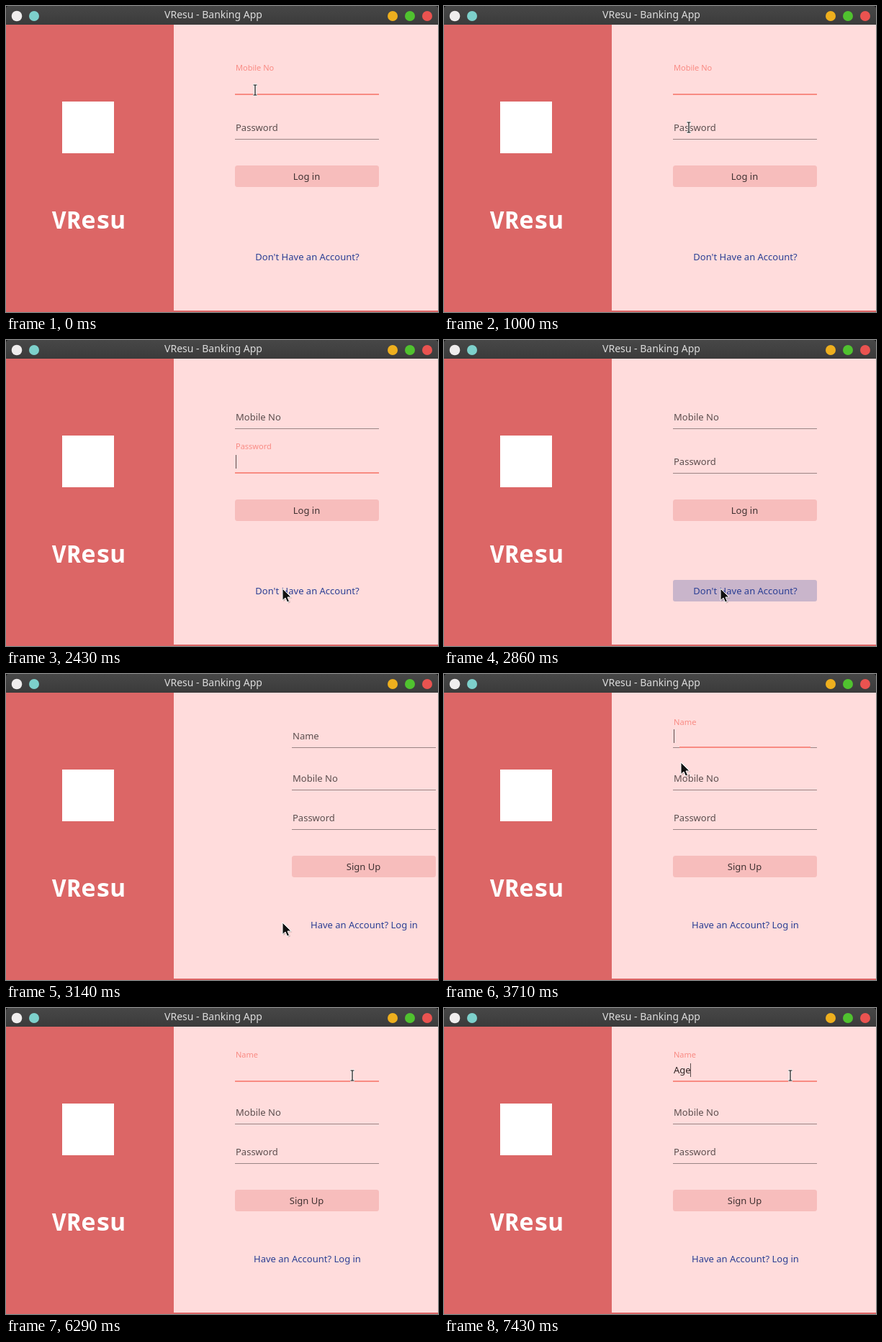
Write an HTML page that moves like this. It is 600 px wide and 426 px high and loops after 8 s.

```html
<!DOCTYPE html>
<html lang="en">
<head>
<meta charset="utf-8">
<title>Banking App</title>
<style>
  html, body { margin: 0; width: 100%; height: 100%; overflow: hidden; background: #dc6666; }
  svg { display: block; width: 600px; height: 426px; font: 13px "Noto Sans", sans-serif; }
  .mid { text-anchor: middle; }
  .hint { fill: #5c4e4e; }
  .link { fill: #2b3f94; }
  .btn { fill: #f7bdbc; }
</style>
</head>
<body>
<svg viewBox="0 0 600 426">
  <defs>
    <linearGradient id="bar" x2="0" y2="1">
      <stop stop-color="#474747"/><stop offset="1" stop-color="#3b3b3b"/>
    </linearGradient>
    <clipPath id="linkBox"><rect x="318" y="334" width="200" height="30" rx="3"/></clipPath>
  </defs>

  <rect width="600" height="426" fill="#dc6666"/>
  <rect x="233" y="26" width="367" height="398" fill="#ffdcdc"/>
  <rect x="78" y="133" width="72" height="72" fill="#fff"/>
  <text class="mid" x="114.5" y="310" fill="#fff" style="font:bold 34px 'Noto Sans Mono',monospace">VResu</text>

  <g id="login">
    <rect class="btn" x="318" y="222" width="200" height="30" rx="3.5"/>
    <text class="mid" x="417.5" y="242" fill="#403232">Log in</text>
    <g clip-path="url(#linkBox)"><circle id="ripple" cx="384" cy="346" fill="#c9b5cb"/></g>
    <text class="mid link" x="418.5" y="354">Don't Have an Account?</text>
  </g>
  <g id="signup">
    <rect class="btn" x="318" y="253" width="200" height="30" rx="3.5"/>
    <text class="mid" x="417.5" y="273" fill="#403232">Sign Up</text>
    <text class="mid link" x="418.5" y="354">Have an Account? Log in</text>
    <text id="typed" x="319" y="91" fill="#2d2323"></text>
  </g>
  <rect id="caret" width="1" height="19" fill="#5c4e4e"/>

  <rect width="600" height="26" fill="#111"/>
  <path d="M0 26V4Q0 0 4 0H596Q600 0 600 4V26Z" fill="url(#bar)"/>
  <text class="mid" x="288" y="17" fill="#dcdcdc" style="font-size:14px">VResu - Banking App</text>
  <circle cx="15" cy="14" r="7.3" fill="#efeded"/>
  <circle cx="39" cy="14" r="7" fill="#7dd0cb"/>
  <circle cx="537" cy="14" r="7" fill="#eeaf1e"/>
  <circle cx="561" cy="14" r="7" fill="#50c22f"/>
  <circle cx="585" cy="14" r="7" fill="#ea5350"/>

  <g id="arrow">
    <path d="M1.5 2V18L5.5 14.5L8 20.5L11 19.3L8.500 13.500H13.500Z" fill="#000" opacity=".2"/>
    <path d="M0 0V16.500L4 13L6.500 19L9.500 17.800L7 12H12Z" fill="#111" stroke="#fff"/>
  </g>
  <g id="beam" fill="none">
    <path d="M-3 -7H3M0 -7V7M-3 7H3" stroke="#fff" stroke-width="3"/>
    <path d="M-2.500 -7H2.500M0 -7V7M-2.500 7H2.500" stroke="#111" stroke-width="1.200"/>
  </g>
</svg>
<script>
const LOOP = 8000, FPS = 7;
const SWITCH = 2950;
const $ = id => document.getElementById(id);
const set = (el, attrs) => { for (const k in attrs) el.setAttribute(k, attrs[k]); };
const show = (el, on) => { el.style.display = on ? '' : 'none'; };
const clamp = v => Math.min(1, Math.max(0, v));
const easeOut = p => 1 - (1 - p) ** 2;
const mix = (a, b, p) => a + (b - a) * p;

function add(parent, tag, attrs) {
  const el = document.createElementNS('http://www.w3.org/2000/svg', tag);
  set(el, attrs);
  return parent.appendChild(el);
}

// form, hint, underline y, focus start, focus end
const fields = [
  ['login', 'Mobile No', 123, -1000, 1280],
  ['login', 'Password', 185, 1280, 2500],
  ['signup', 'Name', 102, 3430, 9999],
  ['signup', 'Mobile No', 161, 9999, 9999],
  ['signup', 'Password', 216, 9999, 9999]
].map(([form, hint, y, from, to]) => {
  const g = $(form);
  add(g, 'rect', { x: 318, y, width: 200, height: 1, fill: '#9a8484' });
  const line = add(g, 'rect', { y: y - 1, height: 2, fill: '#f88b82' });
  const label = add(g, 'text', { x: 319, class: 'hint' });
  label.textContent = hint;
  return { form, y, from, to, line, label };
});

// time, x, y
const pointer = [
  [0, 346, 117], [640, 346, 117], [1290, 336, 207], [1860, 336, 207],
  [2430, 384, 346], [3140, 384, 346], [3500, 329, 123], [4070, 329, 123],
  [4860, 484, 96], [5200, 484, 96], [5430, 483, 97], [5570, 481, 94], [LOOP, 481, 94]
];

// visible from, until, field, x
const carets = [
  [140, 700, 0, 319], [1280, 1780, 1, 319], [2280, 2500, 1, 319],
  [3430, 3930, 2, 319], [4430, 4930, 2, 319], [5430, 6280, 2, 319],
  [6850, 7130, 2, 319], [7130, 7420, 2, 327], [7420, LOOP, 2, 342]
];

function pointerAt(t) {
  const i = pointer.findIndex(k => k[0] > t);
  const a = pointer[i - 1], b = pointer[i];
  const p = clamp((t - a[0]) / (b[0] - a[0]));
  const e = p * p * (3 - 2 * p);
  return [mix(a[1], b[1], e), mix(a[2], b[2], e)].map(Math.round);
}

function drawField(f, t) {
  const p = easeOut(clamp((t - f.from) / 200)) * (1 - easeOut(clamp((t - f.to) / 200)));
  const active = t >= f.from && t < f.to;
  const w = 200 * p;
  set(f.line, { x: 418 - w / 2, width: w });
  set(f.label, { y: f.y - 11 - 22 * p });
  f.label.style.fontSize = 13 - 2 * p + 'px';
  f.label.style.fill = active ? '#f98b84' : '';
}

function draw(t) {
  const form = t < SWITCH ? 'login' : 'signup';
  show($('login'), form === 'login');
  show($('signup'), form === 'signup');
  const slide = Math.max(0, 79 + (3140 - t) * 1.05);
  set($('signup'), { transform: `translate(${slide})` });
  fields.forEach(f => drawField(f, t));
  set($('ripple'), { r: 150 * easeOut(clamp((t - 2500) / 340)) });
  $('typed').textContent = t < 7130 ? '' : t < 7420 ? 'A' : 'Age';

  const caret = carets.find(c => t >= c[0] && t < c[1]);
  show($('caret'), caret);
  if (caret) set($('caret'), { x: caret[3], y: fields[caret[2]].y - 25 });

  const [x, y] = pointerAt(t);
  const overText = fields.some(f => f.form === form && y > f.y - 26 && y <= f.y);
  show($('beam'), overText);
  show($('arrow'), !overText);
  set($(overText ? 'beam' : 'arrow'), { transform: `translate(${x} ${y})` });
}

const start = performance.now();
function tick() {
  const ms = (performance.now() - start) % LOOP;
  const step = Math.floor((ms + 3) * FPS / 1000) % (LOOP * FPS / 1000);
  draw(Math.round(step * 100 / FPS) * 10);
  requestAnimationFrame(tick);
}
tick();
</script>
</body>
</html>
```
